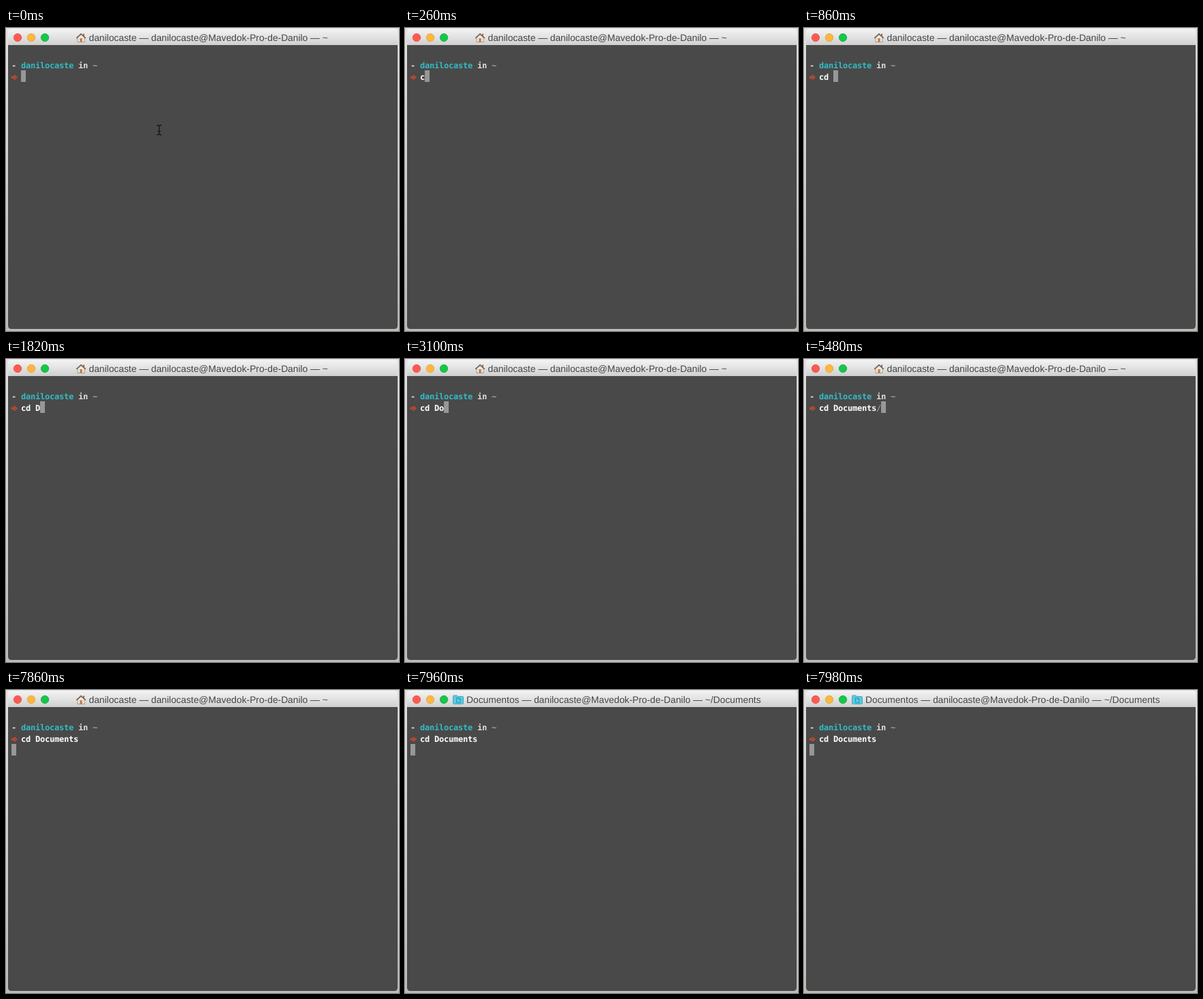
Write an HTML page that moves like this. It is 576 by 444 pixels and loops after 8000 ms.

```html
<!DOCTYPE html>
<html lang="pt">
<head>
<meta charset="utf-8">
<title>Terminal</title>
<style>
  html, body { margin: 0; width: 100%; height: 100%; overflow: hidden; background: #d6d6d4; }
  svg { display: block; width: 576px; height: 444px; }
  text { white-space: pre; text-rendering: geometricPrecision; }
  .title { font: 13.8px "Liberation Sans", Arial, sans-serif; fill: #454545; }
  .mono { font: bold 12px "DejaVu Sans Mono", monospace; letter-spacing: -.224px; fill: #fff; }
</style>
</head>
<body>
<svg viewBox="0 0 576 444">
  <defs>
    <linearGradient id="bar" x2="0" y2="1">
      <stop offset="0" stop-color="#f3f3f4"/>
      <stop offset=".5" stop-color="#e3e3e4"/>
      <stop offset="1" stop-color="#cfcfd0"/>
    </linearGradient>
    <linearGradient id="shade" x2="0" y2="1">
      <stop offset="0" stop-color="#e2e2e2"/>
      <stop offset="1" stop-color="#bdbdb8"/>
    </linearGradient>
  </defs>

  <rect width="576" height="444" fill="url(#shade)"/>
  <path d="M3 25H574V436Q574 441 569 441H8Q3 441 3 436Z" fill="#494949"/>
  <path d="M3 25V6Q3 1 8 1H569Q574 1 574 6V25Z" fill="url(#bar)"/>

  <g stroke-width=".8">
    <circle cx="17" cy="14" r="5.7" fill="#fd5b50" stroke="#e2473d"/>
    <circle cx="37" cy="14" r="5.7" fill="#feb740" stroke="#e0a033"/>
    <circle cx="57" cy="14" r="5.7" fill="#15c748" stroke="#13ab3d"/>
  </g>

  <g id="home">
    <path d="M105 14L110 9.5L115 14V20.5H105Z" fill="#efe9de" stroke="#918a80" stroke-width=".8"/>
    <path d="M113 8.5H115V12L113 10.5Z" fill="#8f6650"/>
    <path d="M103.2 14.8L110 8.6L116.8 14.8" fill="none" stroke="#7c6556" stroke-width="1.7"/>
    <path d="M108.3 15H111.7V20.5H108.3Z" fill="#c87a46"/>
  </g>
  <g id="folder">
    <path d="M70.5 9Q70.5 8 71.5 8H76L77.5 9.5H84.5Q85.5 9.5 85.5 10.5V19.5Q85.5 20.5 84.5 20.5H71.5Q70.5 20.5 70.5 19.5Z" fill="#5acbe0" stroke="#3fabc2"/>
    <path d="M75.5 11.5H79L81 13.5V18.5H75.5ZM79 11.5V13.5H81" fill="none" stroke="#2b93ac"/>
  </g>
  <text id="title" class="title" y="19"></text>

  <g class="mono">
    <text x="8" y="59" fill="#e0e0e0">-</text>
    <text x="22" y="59" fill="#33bcc4">danilocaste</text>
    <text x="106" y="59" fill="#dedede">in</text>
    <text x="127" y="59" fill="#a8a878">~</text>
    <path d="M8.5 71H12.3V68.8L16.5 72.3L12.3 75.8V73.6H8.5Z" fill="#a8452c" stroke="#cf4f2c" stroke-width=".9"/>
    <rect id="cursor" width="7" height="17" fill="#979797"/>
    <text x="22" y="76"><tspan id="command"></tspan><tspan id="slash" fill="#a09484">/</tspan></text>
  </g>

  <path id="pointer" d="M221 142.5H223L224.5 144L226 142.5H228M224.5 144V155M221 156.5H223L224.5 155L226 156.5H228M222.5 151.5H226.5" fill="none" stroke="#151515" stroke-width="1.3"/>
</svg>
<script>
  const LOOP = 8000, CELL = 7;
  const COMPLETED = 5480, ENTERED = 7860, RETITLED = 7960;
  const HOST = 'danilocaste@Mavedok-Pro-de-Danilo';
  const typed = [
    [0, ''], [160, 'c'], [420, 'cd'], [860, 'cd '], [1820, 'cd D'],
    [2780, 'cd Do'], [4080, 'cd Doc'], [COMPLETED, 'cd Documents']
  ];
  const $ = id => document.getElementById(id);
  const show = (id, visible) => $(id).setAttribute('visibility', visible ? 'visible' : 'hidden');

  function render(t) {
    const command = typed.filter(([start]) => start <= t).pop()[1];
    const entered = t >= ENTERED, retitled = t >= RETITLED;
    const slash = t >= COMPLETED && !entered;

    $('command').textContent = command;
    show('slash', slash);
    $('cursor').setAttribute('x', entered ? 8 : 22 + CELL * (command.length + slash));
    $('cursor').setAttribute('y', entered ? 79 : 62);
    show('pointer', t < 160);

    show('home', !retitled);
    show('folder', retitled);
    $('title').setAttribute('x', retitled ? 90 : 121.5);
    $('title').textContent = retitled
      ? `Documentos — ${HOST} — ~/Documents`
      : `danilocaste — ${HOST} — ~`;
  }

  const begin = performance.now();
  function tick() {
    render((performance.now() - begin) % LOOP);
    requestAnimationFrame(tick);
  }
  tick();
</script>
</body>
</html>
```
